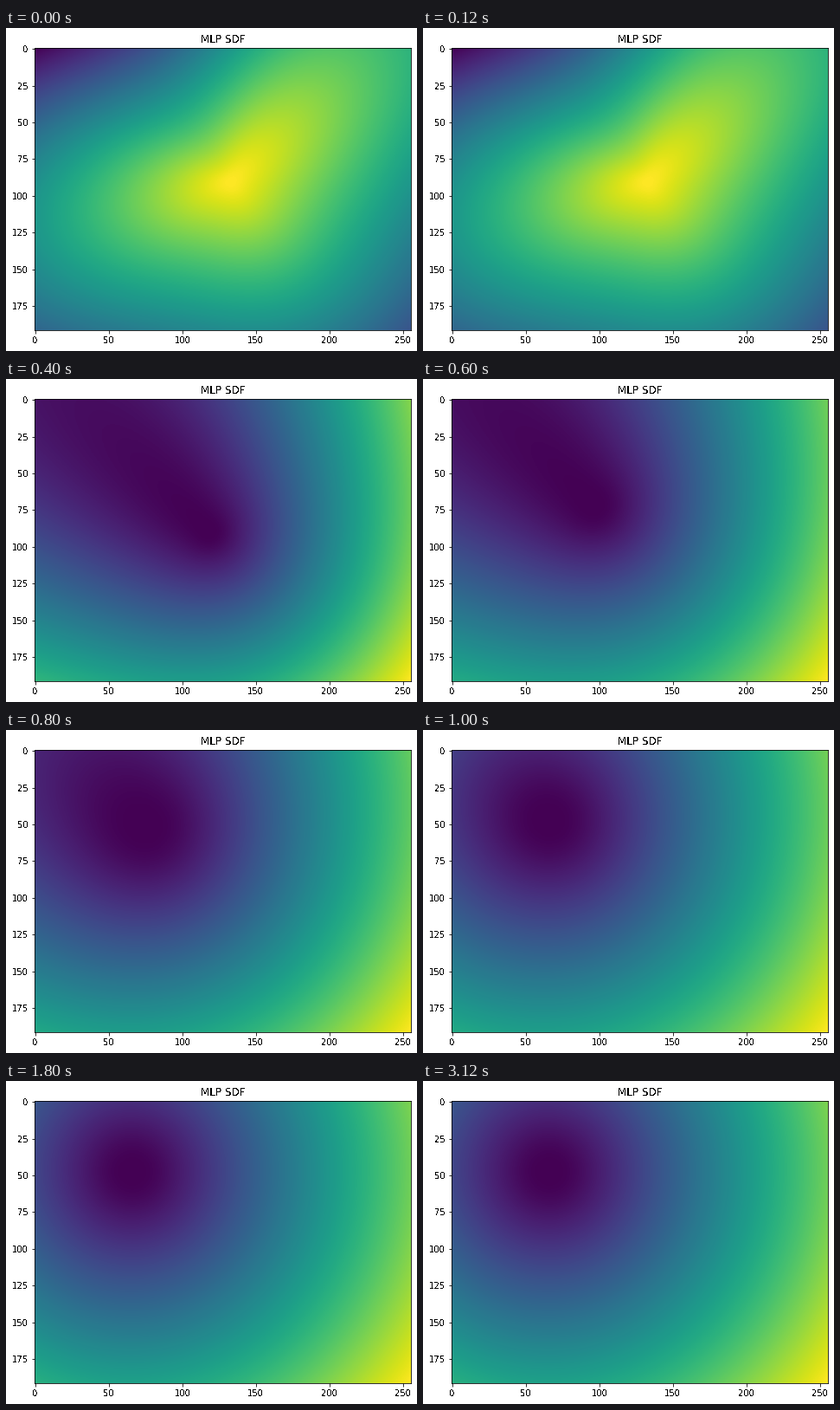
Write a matplotlib script that moves like this. It is 475x373 px and loops after 4000 ms.

```python
import numpy as np
import matplotlib.pyplot as plt
from matplotlib.animation import FuncAnimation

W, H, DPI = 475, 373, 72
COLS, ROWS = 256, 192
STEP = 200

plt.rcParams.update({"font.family": "DejaVu Sans", "font.size": 10,
                     "text.antialiased": False})

X, Y = np.meshgrid(np.arange(COLS), np.arange(ROWS))


def polar(cx, cy):
    return np.hypot(X - cx, Y - cy), np.arctan2(Y - cy, X - cx)


def cone(r, slope, soft):
    """Cone with a flattened tip, scaled so that its highest point is 1."""
    v = slope * (np.cbrt(r**3 + soft**3) - soft)
    return v / v.max()


def untrained():
    """Peak with ridges to the left and the upper right."""
    r, a = polar(133, 91)
    slope = (1 - 0.16 * np.cos(a) + 0.31 * np.cos(2 * (a - np.pi / 3))
             + 0.17 * np.cos(3 * a))
    return 1 - cone(r, slope, 4)


def learned(cx, cy, soft, skew):
    """Distance to a disc; skew flattens the side facing the upper left."""
    r, a = polar(cx, cy)
    a = a - np.pi / 4
    return cone(r, 1 + skew * (np.cos(a) - np.cos(2 * a) / 4), soft)


# (field, time on screen in ms)
stages = [
    (untrained(), 200),
    (learned(122, 92, 8, 0.70), 200),
    (learned(118, 90, 9, 0.74), 200),
    (learned(96, 72, 14, 0.74), 200),
    (learned(75, 52, 26, 0.47), 200),
    (learned(66, 48, 22, 0.20), 800),
    (learned(66, 48, 18, 0.04), 2200),
]
order = [i for i, (_, ms) in enumerate(stages) for _ in range(ms // STEP)]

fig = plt.figure(figsize=(W / DPI, H / DPI), dpi=DPI, facecolor="white")
ax = fig.add_axes([33.1 / W, 23.64 / H, 434.88 / W, 326.16 / H])
img = ax.imshow(stages[0][0], cmap="viridis", vmin=0, vmax=1, aspect="auto")
ax.set_xticks(range(0, COLS, 50))
ax.set_yticks(range(0, ROWS, 25))
ax.set_title("MLP SDF", fontsize=12)


def draw(n):
    img.set_data(stages[order[n % len(order)]][0])
    return [img]


anim = FuncAnimation(fig, draw, frames=len(order), interval=STEP,
                     repeat=True, repeat_delay=0, blit=False)
plt.show()
```
